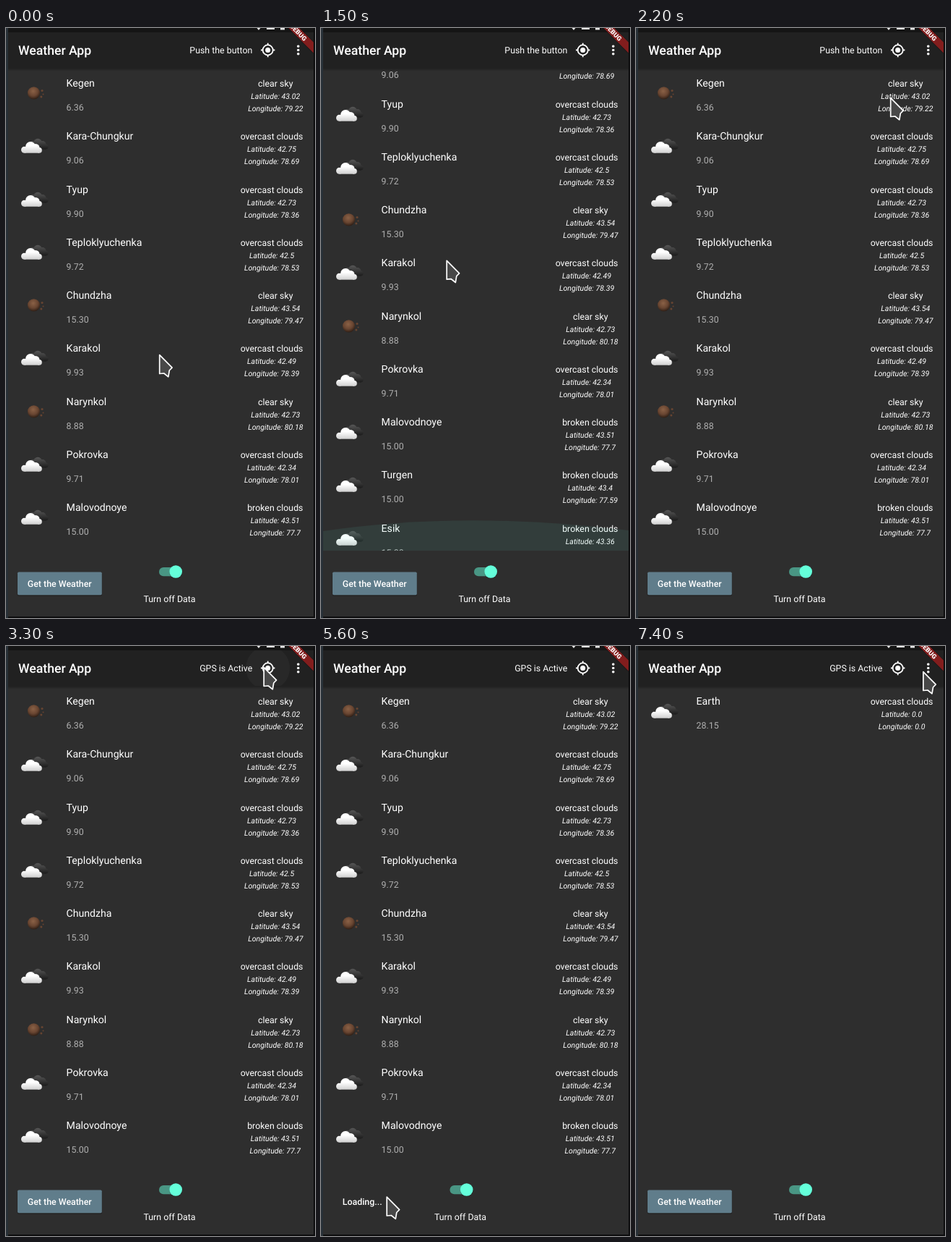
Write an HTML page that moves like this. It is 428 px wide and 815 px high and loops after 8 s.

```html
<!DOCTYPE html>
<html lang="en">
<head>
<meta charset="utf-8">
<title>Weather App</title>
<style>
  html, body { margin: 0; width: 100%; height: 100%; overflow: hidden; background: #2e2e2e; }
  svg { display: block; width: 428px; height: 815px; }
  text { font: 12.36px Roboto, sans-serif; fill: #fff; text-rendering: geometricPrecision; }
  .title { font-size: 17.65px; font-weight: 500; }
  .name { font-size: 14.1px; }
  .temp { fill: #b1b1b1; }
  .geo { font-size: 10.57px; font-style: italic; }
  .btn { font-weight: 500; }
  .mid { text-anchor: middle; }
  .end { text-anchor: end; }
  .debug { font-size: 8.95px; font-weight: 900; }
</style>
</head>
<body>
<svg viewBox="0 0 428 815">
  <defs>
    <clipPath id="listClip"><rect x="3" y="55" width="423" height="667"/></clipPath>
    <clipPath id="barClip"><rect x="3" y="6" width="423" height="49"/></clipPath>
    <clipPath id="screenClip"><rect x="3" width="423" height="813"/></clipPath>
    <linearGradient id="shade" x2="0" y2="1">
      <stop stop-color="#000" stop-opacity=".32"/><stop offset="1" stop-color="#000" stop-opacity="0"/>
    </linearGradient>
    <linearGradient id="white" gradientUnits="userSpaceOnUse" x2="0" y1="84" y2="100">
      <stop offset=".35" stop-color="#fff"/><stop offset="1" stop-color="#cfcfcf"/>
    </linearGradient>
    <linearGradient id="dark" gradientUnits="userSpaceOnUse" x2="0" y1="80" y2="95">
      <stop stop-color="#565656"/><stop offset="1" stop-color="#1a1a1a"/>
    </linearGradient>
    <radialGradient id="ball" cx=".45" cy=".35" r=".65">
      <stop stop-color="#8a6146"/><stop offset=".6" stop-color="#684531"/><stop offset="1" stop-color="#2f1f16"/>
    </radialGradient>
    <g id="sun">
      <circle cx="38.5" cy="89.8" r="8.6" fill="url(#ball)"/>
      <g fill="#664431">
        <circle cx="50" cy="86.5" r="1.6"/><circle cx="51.5" cy="91.5" r="1"/><circle cx="48.8" cy="95" r="1.5"/>
      </g>
    </g>
    <g id="cloud">
      <g fill="url(#dark)">
        <circle cx="37" cy="88" r="5"/><circle cx="44" cy="85.5" r="5.8"/>
        <circle cx="50.5" cy="88" r="5"/><circle cx="55" cy="91" r="3.5"/>
        <rect x="37" y="88" width="18" height="6.5"/>
      </g>
      <g fill="url(#white)">
        <circle cx="25.5" cy="95.2" r="4.5"/><circle cx="34" cy="91" r="7"/>
        <circle cx="41" cy="92.5" r="5.5"/><circle cx="46" cy="95.9" r="3.8"/>
        <rect x="25.5" y="92.7" width="20.5" height="7"/>
      </g>
    </g>
  </defs>

  <rect width="428" height="815" fill="#0d0d0e"/>
  <rect width="3" height="815" fill="#283037"/>
  <rect x="3" width="423" height="813" fill="#2e2e2e"/>

  <g clip-path="url(#listClip)">
    <g id="list"></g>
    <g id="earth"></g>
    <path id="glow" d="M3 695Q200 666 426 694V722H3z" fill="#64ffda" fill-opacity=".07"/>
  </g>

  <rect x="3" y="55" width="423" height="5" fill="url(#shade)"/>
  <rect x="3" width="423" height="55" fill="#212121"/>
  <rect x="3" width="423" height="6" fill="#151515"/>
  <path d="M347.5 0h5l-2.5 3zM361 0h11v2h-11zM380 0h6v2.5h-6z" fill="#e8e8e8"/>
  <text class="title" x="17" y="37">Weather App</text>
  <text class="end" id="status" x="341.3" y="35"></text>
  <g clip-path="url(#barClip)"><circle id="ripple" cx="362.7" cy="30.5" r="30.5" fill="#fff"/></g>
  <g transform="translate(362.7 30.5) scale(.88)" fill="none" stroke="#fff" stroke-width="2">
    <circle r="8"/><circle r="4" fill="#fff" stroke="none"/>
    <path d="M0-11v3M0 11v-3M-11 0h3M11 0h-3"/>
  </g>
  <path d="M404.8 25.2v0m0 5.3v0m0 5.3v0" stroke="#fff" stroke-width="3.6" stroke-linecap="round"/>
  <g clip-path="url(#screenClip)">
    <g transform="translate(426 -15) rotate(45)">
      <rect x="-35" y="24" width="70" height="12" fill="#000" opacity=".25"/>
      <rect x="-35" y="24.6" width="70" height="10.5" fill="#821d1d"/>
      <text class="debug mid" y="33">DEBUG</text>
    </g>
  </g>

  <g id="button">
    <rect x="15.7" y="752.5" width="117.4" height="32.5" rx="2.5" fill="#000" opacity=".2"/>
    <rect x="16" y="751.5" width="116.8" height="31.7" rx="1.8" fill="#607d8b"/>
    <text class="btn" x="29.8" y="772">Get the Weather</text>
  </g>
  <text class="btn" id="loading" x="29.8" y="772">Loading...</text>
  <g id="toggle">
    <rect x="212" y="745" width="29" height="12.3" rx="6.15" fill="#499684"/>
    <circle cx="235.2" cy="751.8" r="9" fill="#000" opacity=".2"/>
    <circle cx="235.2" cy="751" r="8.8" fill="#64ffda"/>
    <text class="mid" x="226.5" y="793">Turn off Data</text>
  </g>

  <path id="cursor" d="M1.2 1.6V27.5L7.3 27L13.3 31.8L14.8 23L18.6 19.2z"
        fill="#484848" stroke="#fff" stroke-width="1.7" stroke-linejoin="round"/>
</svg>
<script>
const LOOP = 8000, TICK = 100, PITCH = 73.25, RIGHT = 411.5, MAX_SCROLL = 286;
const $ = id => document.getElementById(id);

const places = `Kegen, 6.36, clear sky, 43.02, 79.22
Kara-Chungkur, 9.06, overcast clouds, 42.75, 78.69
Tyup, 9.90, overcast clouds, 42.73, 78.36
Teploklyuchenka, 9.72, overcast clouds, 42.5, 78.53
Chundzha, 15.30, clear sky, 43.54, 79.47
Karakol, 9.93, overcast clouds, 42.49, 78.39
Narynkol, 8.88, clear sky, 42.73, 80.18
Pokrovka, 9.71, overcast clouds, 42.34, 78.01
Malovodnoye, 15.00, broken clouds, 43.51, 77.7
Turgen, 15.00, broken clouds, 43.4, 77.59
Esik, 15.00, broken clouds, 43.36, 77.45
Issyk-Kul’skaya Oblast’, -8.19, overcast clouds, 42.0, 78.0
Talghar, 15.00, broken clouds, 43.3, 77.23`;

function add(parent, tag, attrs = {}, text = "") {
  const node = document.createElementNS("http://www.w3.org/2000/svg", tag);
  for (const key in attrs) node.setAttribute(key, attrs[key]);
  node.textContent = text;
  return parent.appendChild(node);
}

function addRow(parent, place, i) {
  const [name, temp, sky, lat, lon] = place.split(", ");
  const row = add(parent, "g", { transform: `translate(0 ${Math.round(i * PITCH)})` });
  const left = add(row, "g");
  add(left, "use", { href: sky === "clear sky" ? "#sun" : "#cloud" });
  add(left, "text", { class: "name", x: 83.6, y: 81 }, name);
  add(left, "text", { class: "temp", x: 83.6, y: 114 }, temp);
  const lines = [
    add(row, "text", { class: "mid", y: 81 }, sky),
    add(row, "text", { class: "geo mid", y: 98 }, `Latitude: ${lat}`),
    add(row, "text", { class: "geo mid", y: 115 }, `Longitude: ${lon}`)
  ];
  const width = Math.max(...lines.map(line => line.getComputedTextLength()));
  lines.forEach(line => line.setAttribute("x", RIGHT - width / 2));
  return left;
}

places.split("\n").forEach((place, i) => addRow($("list"), place, i));
const earthLeft = addRow($("earth"), "Earth, 28.15, overcast clouds, 0.0, 0.0", 0);

// Pointer moves: [start, duration, x, y]
const moves = [
  [0, 200, 160, 512], [400, 840, 196, 5], [1240, 450, 168, 388], [1900, 300, 351.5, 95],
  [2200, 200, 356, 50], [2800, 100, 356, 28], [3700, 500, 388.7, 28], [4200, 400, 90, 759.5],
  [6400, 300, 262, 98.5], [6800, 600, 396.7, 34]
];

// Eased 0 to 1, fast first
function ramp(t, start, duration) {
  const p = Math.min(Math.max((t - start) / duration, 0), 1);
  return p * (2 - p);
}

function pointerAt(t) {
  let x = 211.5, y = 450;
  for (const [start, duration, toX, toY] of moves) {
    const k = ramp(t, start, duration);
    x += (toX - x) * k;
    y += (toY - y) * k;
  }
  return [x, y];
}

const show = (node, on) => node.setAttribute("visibility", on ? "visible" : "hidden");
const fade = (node, opacity) => node.setAttribute("opacity", opacity);
const move = (node, x, y) => node.setAttribute("transform", `translate(${x} ${y})`);

function draw(t) {
  const loading = t >= 5600 && t < 5900, loaded = t >= 5900;
  const scroll = MAX_SCROLL * (ramp(t, 400, 400) - ramp(t, 1300, 560));
  move($("cursor"), ...pointerAt(t));
  move($("list"), 0, -Math.round(scroll));
  fade($("glow"), ramp(t, 1300, 100) - ramp(t, 1500, 300));
  fade($("ripple"), .12 * (ramp(t, 3100, 100) - ramp(t, 3200, 200)));
  fade(earthLeft, t < 6200 ? .5 : 1);
  $("status").textContent = t < 3300 ? "Push the button" : "GPS is Active";
  show($("list"), !loaded);
  show($("earth"), loaded);
  show($("button"), !loading);
  show($("loading"), loading);
  move($("toggle"), loading ? -33.5 : 0, 0);
}

const start = performance.now();
function loop() {
  const t = (performance.now() - start) % LOOP;
  draw(Math.floor(t / TICK) * TICK);
  requestAnimationFrame(loop);
}
loop();
</script>
</body>
</html>
```
